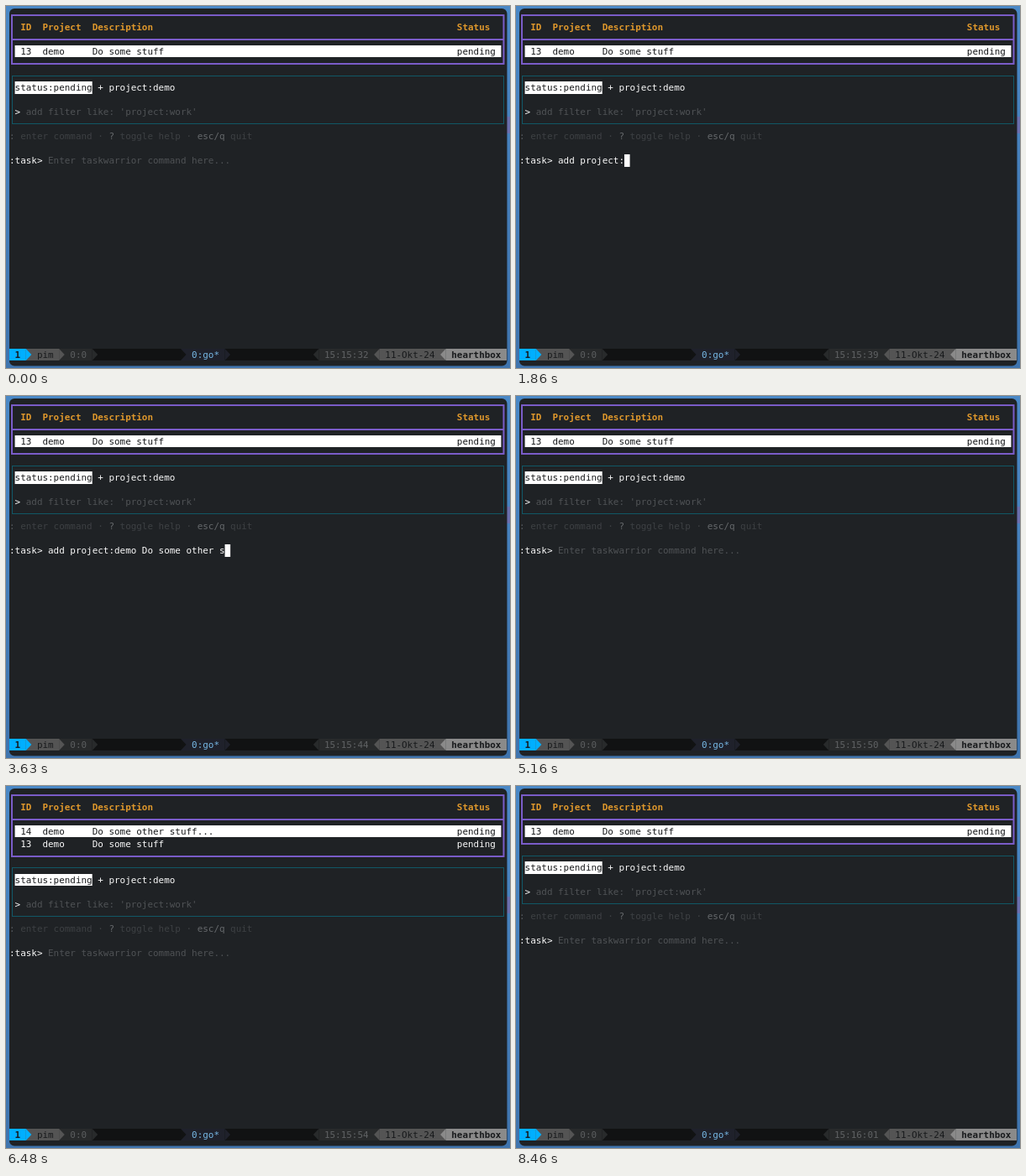
An HTML page with a canvas that plays this animation: 600x432 px, repeating every 8760 ms.

```html
<!DOCTYPE html>
<html lang="en">
<head>
<meta charset="utf-8">
<title>Task list in a terminal</title>
<style>
  html, body { margin: 0; width: 100%; height: 100%; overflow: hidden; background: #437db9; }
  canvas { display: block; width: 600px; height: 432px; }
</style>
</head>
<body>
<canvas id="stage" width="600" height="432"></canvas>
<script>
const LOOP = 8760, CW = 6.578, CH = 14.48, LEFT = 4, TOP = 3.4;
const WHITE = '#fbfbfb', INK = '#17191b', DIM = '#505356', FAINT = '#3e4144', ORANGE = '#df982c';
const ctx = document.getElementById('stage').getContext('2d');

// Bursts of typing: start, ms per key, text
const BURSTS = [
  [900, 100, 'add '], [1560, 0, 'project:'], [2220, 60, 'demo '],
  [2730, 53, 'Do some other '], [3630, 80, 'stuff'], [4200, 120, '...']
];
const FOCUS = 480, ENTER = 4860;
const ADDED = 5190, DOWN = 5580, SORTED = 6000, UP = 6480, REMOVED = 7770;

const colX = c => LEFT + c * CW;
const rowY = r => TOP + r * CH;

function cells(col, row, count, color) {
  const y = Math.round(rowY(row));
  ctx.fillStyle = color;
  ctx.fillRect(colX(col), y, count * CW, Math.round(rowY(row + 1)) - y);
}

function print(col, row, text, color, bold) {
  ctx.font = (bold ? 'bold ' : '') + '10.93px "DejaVu Sans Mono", "Noto Sans Mono", monospace';
  ctx.fillStyle = color;
  const y = Math.round(rowY(row) + 11.2);
  [...text].forEach((ch, i) => ctx.fillText(ch, colX(col + i), y));
}

// Powerline separator filling one cell; dir 1 points right, -1 left
function arrow(col, row, color, dir) {
  const y0 = Math.round(rowY(row)), y1 = Math.round(rowY(row + 1));
  const base = colX(dir > 0 ? col : col + 1);
  ctx.fillStyle = color;
  ctx.beginPath();
  ctx.moveTo(base, y0);
  ctx.lineTo(base + dir * CW, (y0 + y1) / 2);
  ctx.lineTo(base, y1);
  ctx.fill();
}

function box(top, bottom, color, width, rule) {
  const mid = r => Math.floor(rowY(r) + CH / 2) + (width === 1 ? .5 : 1);
  const x = width === 1 ? 7.5 : 7;
  ctx.strokeStyle = color;
  ctx.lineWidth = width;
  ctx.strokeRect(x, mid(top), 592.5 - x, mid(bottom) - mid(top));
  if (rule) {
    ctx.beginPath();
    ctx.moveTo(x, mid(rule));
    ctx.lineTo(592.5, mid(rule));
    ctx.stroke();
  }
}

function background() {
  const desk = ctx.createLinearGradient(0, 0, 0, 432);
  desk.addColorStop(0, '#4a88c6');
  desk.addColorStop(1, '#3f74ae');
  ctx.fillStyle = desk;
  ctx.fillRect(0, 0, 600, 432);
  ctx.fillStyle = '#6a6fae';
  ctx.fillRect(596, 132, 4, 20);
  ctx.fillStyle = '#1f2225';
  ctx.beginPath();
  ctx.roundRect(4, 3, 592.5, 426.5, 6);
  ctx.fill();
}

function table(tasks, selected) {
  box(0, 3 + tasks.length, '#7a5cc8', 2, 2);
  [[2, 'ID'], [6, 'Project'], [15, 'Description'], [81, 'Status']]
    .forEach(([col, name]) => print(col, 1, name, ORANGE, true));
  tasks.forEach(([id, title], i) => {
    const on = i === selected, row = 3 + i, color = on ? INK : WHITE;
    if (on) cells(1, row, 88, '#ffffff');
    print(2, row, id, color);
    print(6, row, 'demo', color);
    print(15, row, title, color);
    print(81, row, 'pending', color);
  });
}

function filters(row) {
  box(row, row + 4, '#115866', 1);
  cells(1, row + 1, 14, '#ffffff');
  print(1, row + 1, 'status:pending', INK);
  print(16, row + 1, '+ project:demo', WHITE);
  print(1, row + 3, '>', WHITE);
  print(3, row + 3, "add filter like: 'project:work'", DIM);
  print(0, row + 5, ': enter command ·   toggle help ·       quit', FAINT);
  print(0, row + 5, ':', DIM);
  print(18, row + 5, '?', '#66696c');
  print(34, row + 5, 'esc/q', '#66696c');
}

function typed(t) {
  let text = '';
  for (const [start, step, part] of BURSTS)
    if (t >= start) text += step ? part.slice(0, 1 + Math.floor((t - start) / step)) : part;
  return text;
}

function prompt(row, t) {
  const active = t >= FOCUS && t < ENTER;
  const text = active ? typed(t) : '';
  const blink = t >= 1710 && t < 1830;
  print(0, row, ':task>', WHITE);
  if (text) print(7, row, text, WHITE);
  else print(7, row, 'Enter taskwarrior command here...', DIM);
  if (active && !blink) {
    cells(7 + text.length, row, 1, '#ffffff');
    if (!text) print(7, row, 'E', INK);
  }
}

function clock(t) {
  const s = 15 * 60 + 32 + Math.floor((t + 240) / 300);
  return '15:' + Math.floor(s / 60) + ':' + String(s % 60).padStart(2, '0');
}

function statusBar(t) {
  const row = 28, dark = '#111213', low = '#282a2b', mid = '#545454', high = '#8a8a8a';
  cells(0, row, 90, dark);
  cells(0, row, 15, low);
  arrow(15, row, low, 1);
  cells(0, row, 9, mid);
  arrow(9, row, mid, 1);
  cells(0, row, 3, '#00afff');
  arrow(3, row, '#00afff', 1);
  print(1, row, '1', INK, true);
  print(5, row, 'pim', INK);
  print(11, row, '0:0', '#5c5e60');

  cells(31, row, 8, '#1f212b');
  arrow(31, row, dark, 1);
  arrow(39, row, '#1f212b', 1);
  print(33, row, '0:go*', '#77b9e6');

  arrow(55, row, low, -1);
  cells(56, row, 11, low);
  arrow(66, row, mid, -1);
  cells(67, row, 12, mid);
  arrow(78, row, high, -1);
  cells(79, row, 11, high);
  print(57, row, clock(t), '#606264');
  print(68, row, '11-Okt-24', INK);
  print(80, row, 'hearthbox', INK, true);
}

function draw(t) {
  const first = ['13', 'Do some stuff'], second = ['14', 'Do some other stuff...'];
  const two = t >= ADDED && t < REMOVED;
  const tasks = !two ? [first] : t < SORTED ? [first, second] : [second, first];
  const selected = t >= DOWN && t < UP ? 1 : 0;
  const row = 4 + tasks.length;
  background();
  table(tasks, selected);
  filters(row);
  prompt(row + 7, t);
  statusBar(t);
}

const began = performance.now();
function frame() {
  draw((performance.now() - began) % LOOP);
  requestAnimationFrame(frame);
}
frame();
</script>
</body>
</html>
```
